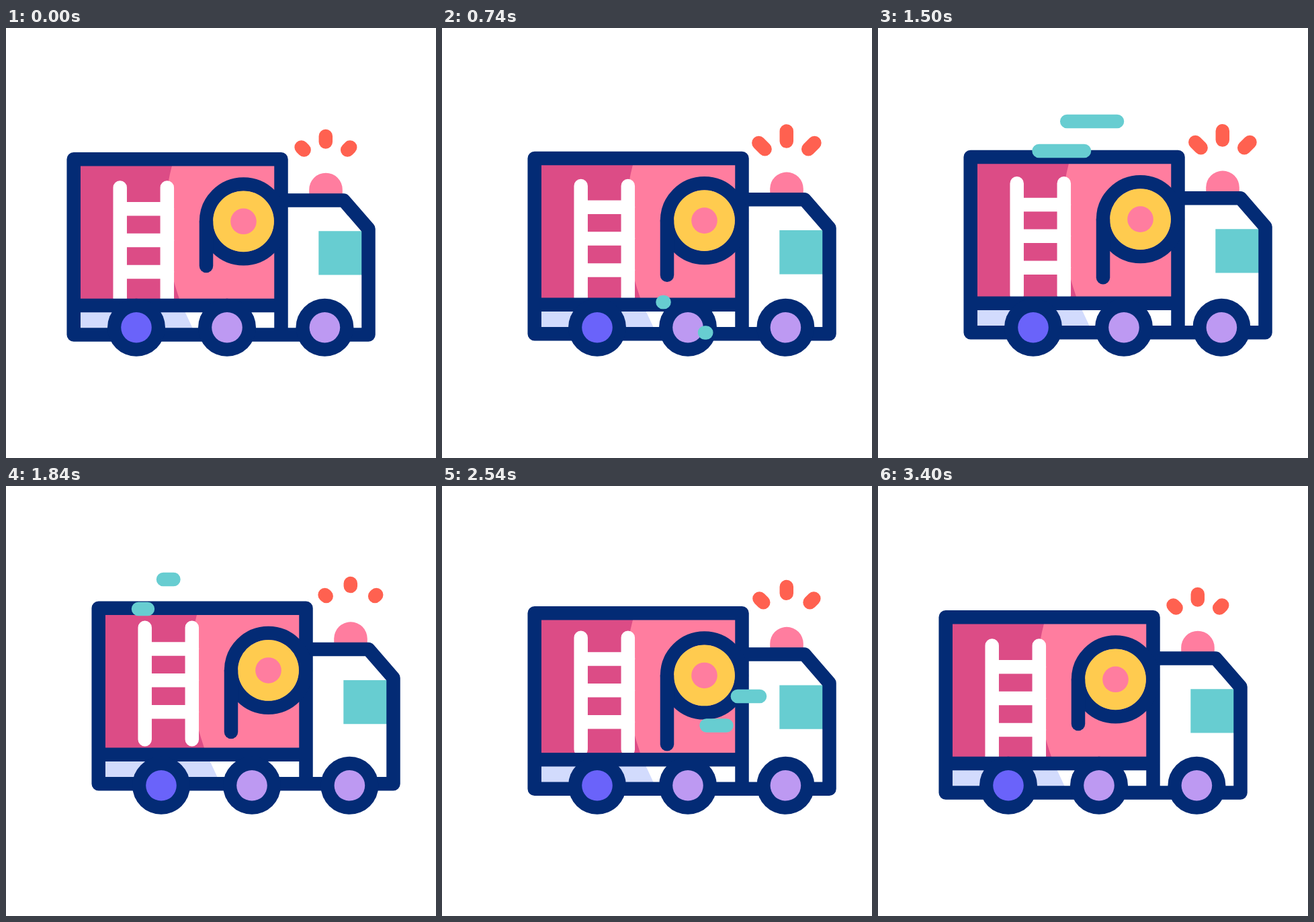
These frames come from a looping animation (640 by 640 pixels, 3600 ms). An HTML page:

```html
<!DOCTYPE html>
<html lang="en">
<head>
<meta charset="utf-8">
<title>Fire truck</title>
<style>
  html, body { margin: 0; width: 100%; height: 100%; overflow: hidden; background: #fff; }
  svg { display: block; width: 100%; height: 100%; }
  .line { fill: none; stroke: #032b75; stroke-width: 20.5; stroke-linecap: round; stroke-linejoin: round; }
  .ladder { stroke: #fff; }
  .spark { stroke: #ff6150; }
  .wind { stroke: #67cdd1; }
</style>
</head>
<body>
<svg viewBox="0 0 640 640">
  <g id="truck">
    <g id="body">
      <path fill="#ff7d9f" d="M100 195H410V413H100Z"/>
      <path fill="#dc4c86" d="M100 195H249L247 205Q222 300 258 403L262 413H100Z"/>
      <path fill="#d2dbfd" d="M100 413H262L282 456H100Z"/>
      <g id="ladder">
        <path class="line ladder" d="M169.7 237.5V404M239.8 237.5V404M170 269.2H240M170 316H240M170 363H240"/>
      </g>
      <path fill="#67cdd1" d="M465.3 302.3H540V367.6H465.3Z"/>
      <path fill="#fff" d="M503 246L560 246V310Z"/>
      <path fill="#ff7d9f" d="M451.2 256V240.5a24.8 24.8 0 0 1 49.6 0V256Z"/>
      <path class="line" d="M409.5 456.5H100.7V195.2H409.5V456.5H539.5V299L502.5 256.4H409.5M100.7 413H409.5"/>
      <circle class="line" cx="353.5" cy="287.8" r="55.4"/>
      <circle cx="353.5" cy="287.8" r="45.4" fill="#ffcb4f"/>
      <circle cx="353.5" cy="287.8" r="19.3" fill="#ff7d9f"/>
      <path class="line" id="hose"/>
      <path class="line spark" id="sparks"/>
    </g>
    <g id="wheels"></g>
  </g>
  <path class="line wind" id="wind"/>
</svg>
<script>
const el = id => document.getElementById(id);
const mix = (a, b, k) => a + (b - a) * k;
const ease = (t, from, to) => {
  const u = Math.min(1, Math.max(0, (t - from) / (to - from)));
  return u * u * (3 - 2 * u);
};
const shift = (id, x, y) => el(id).setAttribute('transform', `translate(${x} ${y})`);

el('wheels').innerHTML = [[194, '#6a63fa'], [329, '#bd99f2'], [474.4, '#bd99f2']].map(([x, color]) =>
  `<circle cx="${x}" cy="445.8" r="43" fill="#032b75"/><circle cx="${x}" cy="445.8" r="22.8" fill="${color}"/>`).join('');

// Hose extension: [time, length]
const hoseKeys = [[0, 0], [400, 11.5], [800, 15.3], [1600, 20.5], [2200, 34], [2800, 37.5], [3200, 0]];

// Wind streaks: [start time, then x of the right end, y and length for each of two lines]
const STREAK = 283;
const streaks = [
  [198, 438.5, 408, 110, 515, 453.5, 124],
  [764, 473, 313, 122, 423.5, 356.5, 110],
  [1338, 356, 139, 122, 307, 183, 110],
  [1896, 193.2, 406.3, 110, 269.7, 451.3, 124],
  [2444, 473, 313, 122, 423.5, 356.5, 110]
];

function hosePath(t) {
  let length = 0;
  for (let i = 1; i < hoseKeys.length; i++) {
    const [from, a] = hoseKeys[i - 1], [to, b] = hoseKeys[i];
    length += (b - a) * ease(t, from, to);
  }
  return `M298 287.8V${354 + length}`;
}

// Each spark grows outwards from its inner end, then wears away towards its tip.
function sparkPath(t) {
  if (t > 2670 && t < 2910) return '';
  let inner = 0, up = 8.7, side = 4;
  if (t < 2910) {
    const phase = t % 800;
    if (phase < 400) {
      const k = ease(phase, 0, 400);
      if (t > 400) { up = mix(15.7, 8.7, k); side = mix(9.8, 4, k); }
      inner = k;
    } else {
      const k = ease(phase, 400, 800);
      up = 15.7 * k;
      side = 9.8 * k;
    }
  }
  if (inner > 0.999 || up < 0.05) return '';
  const ray = (x, y, dx, dy) => `M${x + dx * inner} ${y + dy * inner}L${x + dx} ${y + dy}`;
  return ray(475.8, 169.6, 0, -up) + ray(443.6, 181.4, -side, -side) + ray(508.2, 181.4, side, -side);
}

function windPath(t) {
  let d = '';
  for (const [start, ...lines] of streaks) {
    if (t <= start || t >= start + 2 * STREAK) continue;
    const head = ease(t, start, start + STREAK);
    const tail = ease(t, start + STREAK, start + 2 * STREAK);
    for (let i = 0; i < 6; i += 3) {
      const [x, y, length] = lines.slice(i);
      d += `M${x - length * tail} ${y}H${x - length * head}`;
    }
  }
  return d;
}

function draw() {
  const t = performance.now() % 3600;
  const phase = t < 3200 ? t % 800 : 0;
  const lift = -20.5 * (ease(phase, 0, 400) - ease(phase, 400, 800));
  shift('truck', 37 * (ease(t, 0, 400) - ease(t, 2800, 3200)), 0);
  shift('body', 0, lift);
  shift('ladder', 0, lift);
  el('hose').setAttribute('d', hosePath(t));
  el('sparks').setAttribute('d', sparkPath(t));
  el('wind').setAttribute('d', windPath(t));
  requestAnimationFrame(draw);
}
draw();
</script>
</body>
</html>
```
